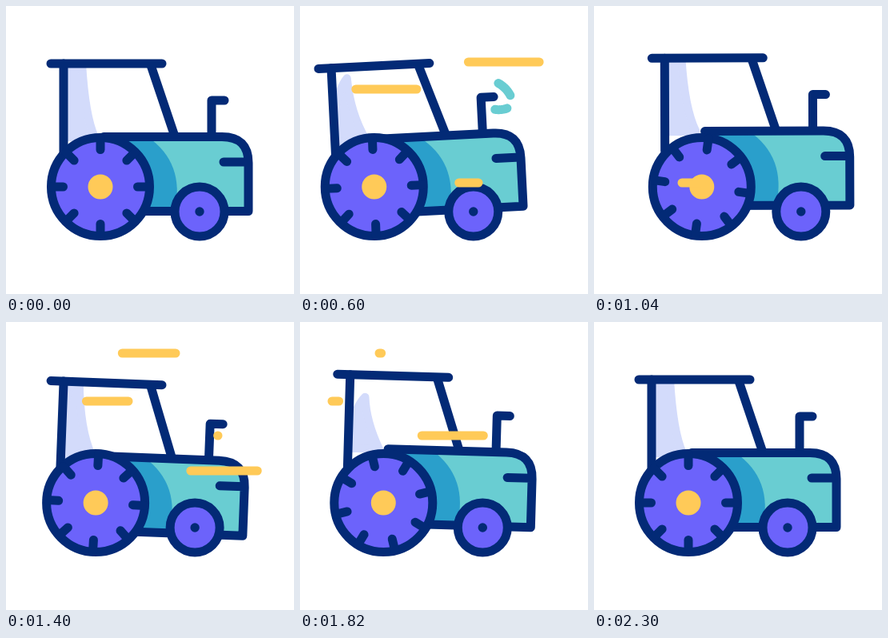
Recreate the animation shown at these times as an HTML page with a canvas. Size 360 by 360 pixels, loop 2400 ms.

```html
<!DOCTYPE html>
<html lang="en">
<head>
<meta charset="utf-8">
<title>Tractor</title>
<style>
  html, body { margin: 0; height: 100%; overflow: hidden; background: #fff; }
  canvas { display: block; width: 100vw; height: 100vh; }
</style>
</head>
<body>
<canvas width="360" height="360"></canvas>
<script>
const ctx = document.querySelector('canvas').getContext('2d');
const LOOP = 2400, STROKE = 11;
const NAVY = '#032a76', PURPLE = '#6c63fb', TEAL = '#69cdd2', BLUE = '#2a9fcb',
      YELLOW = '#ffca58', LAVENDER = '#d3dbfb';

const clamp = v => Math.min(1, Math.max(0, v));
const sine = v => (1 - Math.cos(Math.PI * clamp(v))) / 2;
const mix = (a, b, k) => a + (b - a) * k;

// Eased keyframes: [time, value]
function track(keys, t) {
  const i = keys.findIndex(k => k[0] > t);
  if (i < 0) return keys[keys.length - 1][1];
  const [t0, a] = keys[i - 1], [t1, b] = keys[i];
  return mix(a, b, sine((t - t0) / (t1 - t0)));
}

const SHIFT = [[0, 0], [590, -25.3], [1095, 18], [1630, -21]];
const TILT = [[0, 0], [590, -2.9], [1130, 0], [1520, 2.8], [2200, 0]];
const BOUNCE = [[0, 0], [560, 3.5], [960, -8], [1380, 3.8], [1820, -5], [2290, 0]];
const SHINE = [[0, 25], [560, 80], [1250, 30], [1640, 109], [2140, 55], [2290, 25]];

// Speed lines: [right end, y, start time]
const LINES = [[305, 70, 270], [146, 104, 325], [223, 221, 463], [212, 39, 1150],
               [153, 99, 1186], [265, 142, 1385], [316, 186, 1100]];
const LINE_LENGTH = 113, GROW = 450, LAG = 265;

// Smoke curls: control points of quadratic curves
const SMOKE = [[[264, 114, 258, 101, 245, 95], 250], [[242, 129, 252, 131, 261, 127], 250]];

function shift(t) {
  if (t < 1630) return track(SHIFT, t);
  return -21 * (1 - sine(1 - (1 - clamp((t - 1630) / 660)) ** 1.5));
}

function spin(t) {
  const u = t / 2080;
  const push = u < .64 ? 19 * Math.sin(Math.PI * u / .64) ** 2 : 0;
  return 360 * sine(u) + push;
}

function stroke(path, color = NAVY) {
  ctx.strokeStyle = color;
  ctx.stroke(new Path2D(path));
}

function fill(path, color) {
  ctx.fillStyle = color;
  ctx.fill(new Path2D(path));
}

function disc(x, y, r, color, outline) {
  ctx.beginPath();
  ctx.arc(x, y, r, 0, 2 * Math.PI);
  ctx.fillStyle = color;
  ctx.fill();
  if (outline) {
    ctx.strokeStyle = outline;
    ctx.stroke();
  }
}

function drawShine(tip) {
  ctx.save();
  ctx.beginPath();
  ctx.rect(72, 72, 60, 100);
  ctx.clip();
  const edge = 94 + (tip - 72) ** 2 / 900;
  const shape = `M72 ${tip + 60} Q78 ${tip + 20} ${edge - 3} ${tip + 6}
    Q${edge - 1} ${Math.max(tip + 30, 130)} 111 164 H72 Z`;
  ctx.lineWidth = 10;
  fill(shape, LAVENDER);
  stroke(shape, LAVENDER);
  ctx.restore();
}

function drawBody(t) {
  ctx.save();
  ctx.translate(118, 226 + track(BOUNCE, t));
  ctx.rotate(track(TILT, t) * Math.PI / 180);
  ctx.translate(-118, -226);

  drawShine(track(SHINE, t));
  const hull = 'M122 163.5 H270 Q303 163.5 303 196 V256.5 H122';
  fill(hull, TEAL);
  fill('M122 163.5 H177 Q224 196 211 256.5 H122 Z', BLUE);
  stroke('M72 72 V188 M181 74 L210 160 M257 160 V118 H273');
  stroke('M56 72 H195');
  stroke(hull + ' M272 195 H302');
  ctx.restore();
}

function drawWheels(t) {
  disc(242, 257, 31, PURPLE, NAVY);
  disc(242, 257, 5.7, NAVY);
  disc(118, 226, 61.5, PURPLE, NAVY);
  ctx.save();
  ctx.translate(118, 226);
  ctx.rotate(spin(t) * Math.PI / 180);
  for (let i = 0; i < 8; i++) {
    stroke('M0 -46.5 V-61');
    ctx.rotate(Math.PI / 4);
  }
  ctx.restore();
  disc(118, 226, 15.5, YELLOW);
}

// Calls draw with the visible part of a stroke that grows, then shrinks away
function trim(t, start, draw) {
  const head = sine((t - start) / GROW), tail = sine((t - start - LAG) / GROW);
  if (head > tail) draw(tail, head);
}

function drawSmoke(t) {
  for (const [[x0, y0, x1, y1, x2, y2], start] of SMOKE) {
    trim(t, start, (tail, head) => {
      ctx.beginPath();
      for (let i = 0; i <= 12; i++) {
        const k = mix(tail, head, i / 12);
        ctx.lineTo(mix(mix(x0, x1, k), mix(x1, x2, k), k),
                   mix(mix(y0, y1, k), mix(y1, y2, k), k));
      }
      ctx.strokeStyle = TEAL;
      ctx.stroke();
    });
  }
}

function drawLines(t) {
  for (const [x, y, start] of LINES) {
    trim(t, start, (tail, head) =>
      stroke(`M${x - LINE_LENGTH * tail} ${y} H${x - LINE_LENGTH * head}`, YELLOW));
  }
}

function frame(now) {
  const t = now % LOOP;
  ctx.fillStyle = '#fff';
  ctx.fillRect(0, 0, 360, 360);
  ctx.lineWidth = STROKE;
  ctx.lineCap = ctx.lineJoin = 'round';
  ctx.save();
  ctx.translate(shift(t), 0);
  drawBody(t);
  drawWheels(t);
  ctx.restore();
  drawSmoke(t);
  drawLines(t);
}

const begin = performance.now();
function loop() {
  frame(performance.now() - begin);
  requestAnimationFrame(loop);
}
loop();
</script>
</body>
</html>
```
